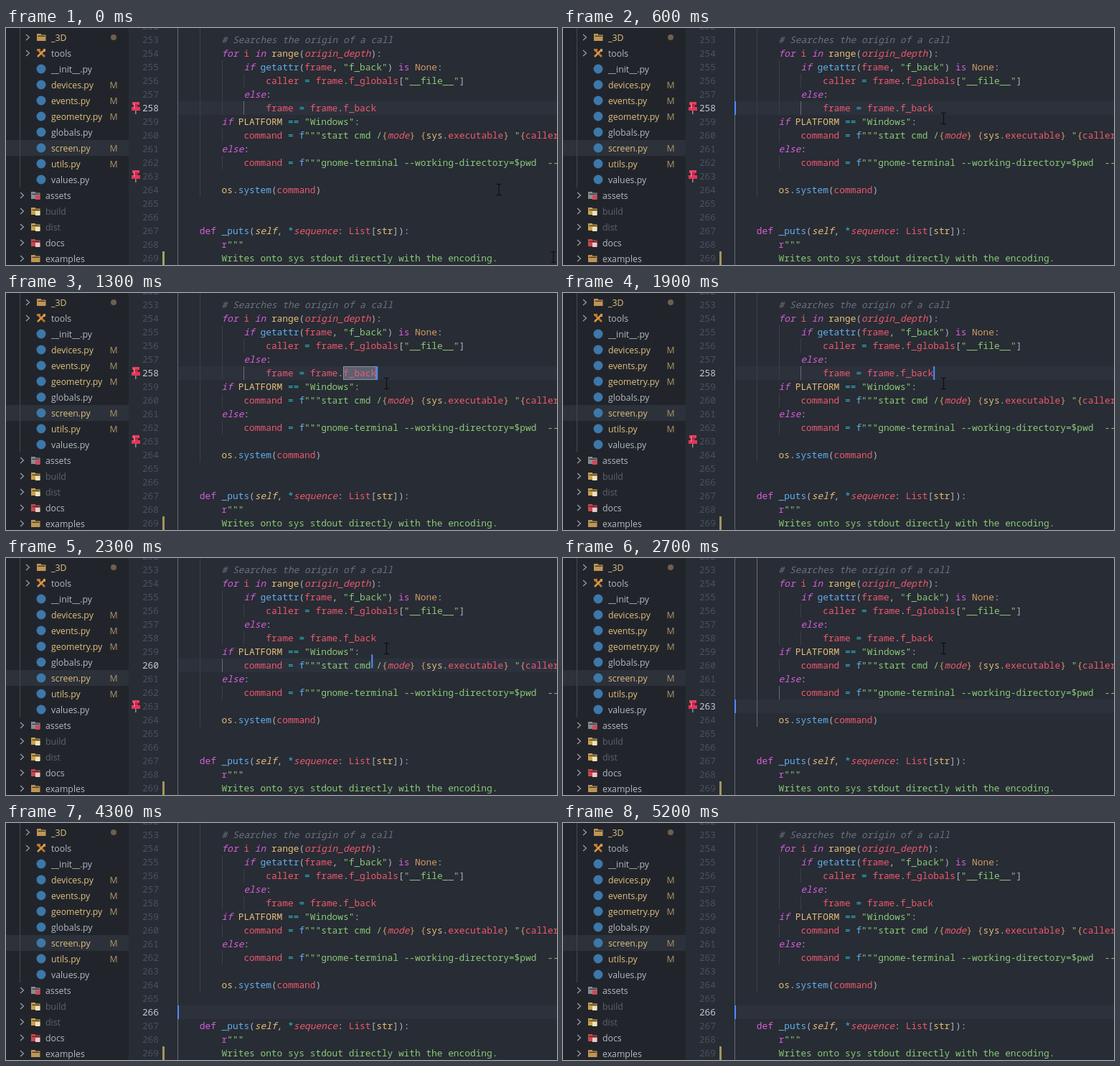
An HTML page with a canvas that plays this animation: 768x330 px, repeating every 5300 ms.

```html
<!DOCTYPE html>
<html lang="en">
<head>
<meta charset="utf-8">
<title>Editor pins</title>
<style>
html, body { margin: 0; width: 100%; height: 100%; overflow: hidden; background: #282c34; }
canvas { display: block; }
</style>
</head>
<body>
<canvas width="768" height="330"></canvas>
<script>
const g = document.querySelector('canvas').getContext('2d');
const LOOP = 5300, STEP = 100, CHAR = 7.7, LEFT = 239, ROW = 19;
const MONO = '12.83px "Noto Sans Mono", monospace';
const UI = '12.3px "Open Sans", "Noto Sans", sans-serif';
const colors = {
  p: '#d55fde', r: '#ef596f', b: '#61afef', g: '#89ca78', y: '#e5c07b',
  o: '#d19a66', c: '#2bbac5', w: '#abb2bf', k: '#6b7280'
};

// "~x" starts a run in colour x; a capital letter makes it italic.
const code = {
  253: [8, '~K# Searches the origin of a call'],
  254: [8, '~Pfor ~ri ~Pin ~yrange~w(~Rorigin_depth~w):'],
  255: [12, '~Pif ~bgetattr~w(~rframe~w, ~g"f_back"~w) ~pis ~oNone~w:'],
  256: [16, '~rcaller ~c= ~rframe~w.~rf_globals~w[~g"__file__"~w]'],
  257: [12, '~Pelse~w:'],
  258: [16, '~rframe ~c= ~rframe~w.~rf_back'],
  259: [8, '~Pif ~yPLATFORM ~c== ~g"Windows"~w:'],
  260: [12, '~rcommand ~c= ~bf~g"""start cmd /~o{~Rmode~o} {~ysys~w.~rexecutable~o} ~g"~o{~rcaller'],
  261: [8, '~Pelse~w:'],
  262: [12, '~rcommand ~c= ~bf~g"""gnome-terminal --working-directory=$pwd  --'],
  264: [8, '~yos~w.~bsystem~w(~rcommand~w)'],
  267: [4, '~pdef ~b_puts~w(~Yself~w, ~c*~Rsequence~w: ~rList~w[~ystr~w]):'],
  268: [8, '~pr~g"""'],
  269: [8, '~gWrites onto sys stdout directly with the encoding.']
};

// label, icon, state, badge
const files = [
  ['_3D', '#c09553', 'dot'], ['tools', 'tools', ''], ['__init__.py', 'py', ''],
  ['devices.py', 'py', 'M'], ['events.py', 'py', 'M'], ['geometry.py', 'py', 'M'],
  ['globals.py', 'py', ''], ['screen.py', 'py', 'M'], ['utils.py', 'py', 'M'],
  ['values.py', 'py', ''], ['assets', '#8b8c91', '', '#d1495b'],
  ['build', '#c6a04e', 'dim', '#eee3bd'], ['dist', '#c6a04e', 'dim', '#eee3bd'],
  ['docs', '#c7484e', '', '#e6c9c9'], ['examples', '#c09553', '']
];

// start time, line, column of each caret move
const moves = [
  [-700, 258, 0], [700, 258, 0], [1200, 258, 36], [1800, 258, 36], [2100, 259, 33],
  [2244, 260, 36], [2344, 261, 13], [2444, 262, 36], [2544, 263, 0],
  [3400, 264, 26], [3500, 265, 0], [4000, 266, 0]
];

const rowY = n => 7 + (n - 253) * ROW;
const colX = col => LEFT + col * CHAR;
const mix = (a, b, k) => a + (b - a) * k;
const clamp = k => Math.max(0, Math.min(1, k));

function box(x, y, w, h, color) {
  g.fillStyle = color;
  g.fillRect(x, y, w, h);
}
function dot(x, y, r, color) {
  g.fillStyle = color;
  g.beginPath();
  g.arc(x, y, r, 0, 7);
  g.fill();
}
function stroke(color, width, ...pts) {
  g.strokeStyle = color;
  g.lineWidth = width;
  g.beginPath();
  for (let i = 0; i < pts.length; i += 2) g.lineTo(pts[i], pts[i + 1]);
  g.stroke();
}
function text(str, x, y, color, font) {
  g.font = font;
  g.fillStyle = color;
  g.fillText(str, x, y);
}

function folder(x, y, color, badge) {
  box(x - 6, y - 5, 6, 3, color);
  box(x - 6, y - 3.5, 12.5, 8.5, color);
  box(x - 4.5, y - 2.2, 10, 1, '#21252b');
  if (badge) box(x, y, 6.5, 6, badge);
}
function toolIcon(x, y) {
  stroke('#c7772e', 2.5, x - 5, y - 5, x + 5, y + 5);
  stroke('#d79a4a', 2.5, x + 5, y - 5, x - 5, y + 5);
  box(x - 6, y - 6, 5, 3, '#c7772e');
  box(x + 3, y - 6, 3, 4, '#d79a4a');
}

function sidebar() {
  box(0, 0, 171, 330, '#21252b');
  box(0, 156, 171, 22, '#2c313a');
  box(19, 0, 1, 222, '#434750');
  files.forEach(([label, icon, state, badge], i) => {
    const y = 13 + i * 22, root = i > 9, x = root ? 41 : 49;
    if (i < 2 || root) stroke('#a0a5ae', 1.1, x - 21, y - 4, x - 16.5, y, x - 21, y + 4);
    if (icon === 'py') dot(x, y, 6.5, '#3c78aa');
    else if (icon === 'tools') toolIcon(x, y);
    else folder(x, y, icon, badge);
    const color = state === 'dim' ? '#5c6370' : state ? '#e2c07d' : '#b4bac4';
    text(label, root ? 55 : 63, y + 4.6, color, UI);
    if (state === 'M') text('M', 144.5, y + 4.6, '#ad9467', UI);
    if (state === 'dot') dot(150, y, 4, '#6d604e');
  });
}

function guides(active) {
  const guide = (col, from, to, lit) =>
    box(Math.round(colX(col)), rowY(from), 1, (to - from + 1) * ROW, lit ? '#666c78' : '#3a3f49');
  guide(0, 252, 270, true);
  guide(4, 252, 264, active > 262 && active < 266);
  guide(8, 255, 258);
  guide(8, 260, 260, active === 260);
  guide(8, 262, 262, active === 262 || active === 263);
  guide(12, 256, 256);
  guide(12, 258, 258, active === 258);
}

function codeLines(active) {
  for (let n = 252; n < 270; n++) {
    const y = rowY(n) + 14;
    text(n, 213 - 3 * CHAR, y, n === active ? '#c3c8d1' : '#495162', MONO);
    if (!code[n]) continue;
    let [col, src] = code[n];
    for (const run of src.split('~').slice(1)) {
      const key = run[0], low = key.toLowerCase(), str = run.slice(1);
      text(str, colX(col), y, colors[low], (key === low ? '' : 'italic ') + MONO);
      col += str.length;
    }
  }
}

function pin(n) {
  const y = rowY(n);
  box(180, y + 10, 1.5, 8, '#8d929c');
  box(176, y + 1, 10, 4, '#e5405f');
  box(178, y + 4, 6, 6, '#c82247');
  box(175, y + 8, 12, 5, '#e5345a');
  box(178, y + 3, 1.5, 7, '#f27f95');
}

function beam(x, y) {
  stroke('#0d0f12', 1.2, x, y - 7, x, y + 7);
  stroke('#0d0f12', 1.2, x - 3.5, y - 7.5, x + 3.5, y - 7.5);
  stroke('#0d0f12', 1.2, x - 3.5, y + 7.5, x + 3.5, y + 7.5);
}

function mouse(t) {
  const into = 1 - (1 - clamp(t / 600)) ** 2, out = clamp((t - 3900) / 400) ** 2;
  beam(mix(mix(687, 530.5, into), 790, out), mix(mix(225, 126, into), 345, out));
  if (t < STEP) beam(763, 319);
}

function caret(t, i) {
  const [start, row, col] = moves[i], [, row0, col0] = moves[Math.max(0, i - 1)];
  if (Math.floor((t - start) / 500) % 2) return;
  const k = clamp((t - start) / 80);
  box(mix(colX(col0), colX(col), k), mix(rowY(row0), rowY(row), k), 2, ROW, '#528bff');
}

function draw(now) {
  const t = Math.floor(now % LOOP / STEP) * STEP;
  const i = moves.findLastIndex(m => m[0] <= t), active = moves[i][1];
  box(0, 0, 768, 330, '#282c34');
  sidebar();
  box(LEFT, rowY(active), 529, ROW, '#2c313c');
  if (t >= 1200 && t < 1800) {
    box(colX(30), rowY(258), 6 * CHAR, ROW, '#596273');
    g.strokeStyle = '#8b93a3';
    g.lineWidth = 1;
    g.strokeRect(colX(30) + .5, rowY(258) + .5, 6 * CHAR - 1, ROW - 1);
  }
  guides(active);
  codeLines(active);
  box(218, 311, 3, 19, t < STEP ? '#91ac62' : '#a3965f');
  if (t < 1900) pin(258);
  if (t < 3000) pin(263);
  caret(t, i);
  mouse(t);
}

const begin = performance.now();
function tick() {
  draw(performance.now() - begin);
  requestAnimationFrame(tick);
}
tick();
</script>
</body>
</html>
```
